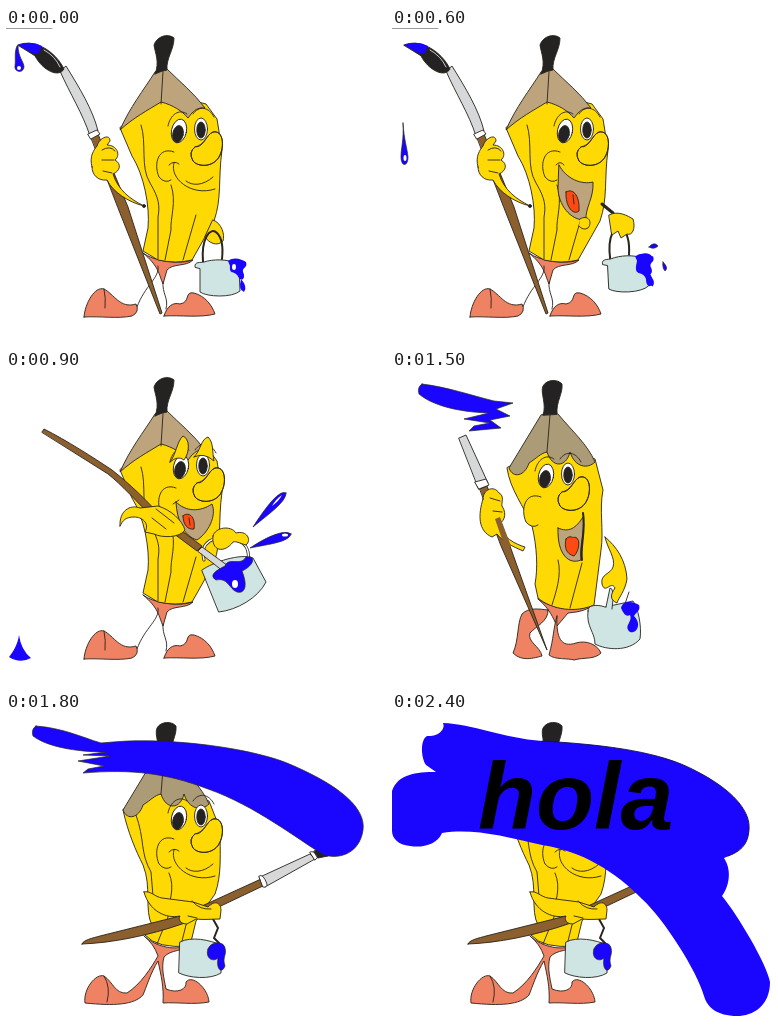
An HTML page for the animation above (2700 ms loop, 380 by 314 pixels).

```html
<!DOCTYPE html>
<html lang="es">
<head>
<meta charset="utf-8">
<title>hola</title>
<style>
  html, body { margin: 0; width: 100%; height: 100%; overflow: hidden; background: #fff; }
  svg { display: block; width: 100%; height: 100%; }
  path, ellipse { stroke: #29241c; stroke-width: .9; stroke-linejoin: round; stroke-linecap: round; fill: none; }
  .y { fill: #ffd903; }
  .tan { fill: #bda47d; }
  .dim { fill: #ac9b77; }
  .skin { fill: #ef8263; }
  .wood { fill: #8c5f2e; }
  .metal { fill: #d6d8da; }
  .tin { fill: #cfe5e4; }
  .k { fill: #242222; }
  .w { fill: #fff; }
  .red { fill: #ff4a12; }
  .b { fill: #1a06ff; stroke: none; }
  .drop { fill: #1a06ff; stroke-width: .7; }
  .shine { fill: #fff; stroke: none; }
  .gloss { stroke: #6b5cff; stroke-width: 2; opacity: .5; }
  text { font: italic bold 95px "Liberation Sans", Arial, sans-serif; }
</style>
</head>
<body>
<svg viewBox="0 0 380 314">
  <defs>
    <linearGradient id="fade" gradientUnits="userSpaceOnUse" x1="30" x2="60">
      <stop stop-color="#1a06ff" stop-opacity=".5"/>
      <stop offset="1" stop-color="#1a06ff"/>
    </linearGradient>
    <g id="feet">
      <path class="skin" d="M137 225C147 233 173 237 187 232C180 239 167 235 161 242L157 256C153 247 153 238 137 225Z"/>
      <path d="M152 238C154 250 139 257 131 279M157 254C156 266 163 270 160 281" stroke-width="1.6"/>
      <path class="skin" d="M78 289C79 275 89 258 98 261C108 266 114 281 130 276Q134 284 126 288C112 291 94 288 78 289Z"/>
      <path class="skin" d="M158 288C161 278 167 274 174 276C185 274 178 263 188 265C199 268 206 277 209 286C194 290 175 287 158 288Z"/>
      <path d="M98 261Q100 270 99 280"/>
    </g>
    <g id="pail">
      <path d="M197 234C195 211 204 198 211 205C217 211 217 222 216 231" style="stroke-width:2"/>
      <path class="tin" d="M189 239C188 233 195 235 198 234C207 231 221 231 229 235C235 236 235 240 233 242L234 263C226 270 201 269 194 264L194 241Z"/>
      <path class="b" d="M222 233C229 228 236 232 240 234C242 240 236 239 237 244C240 250 236 254 233 250C229 241 223 248 224 238Z"/>
      <path class="b" d="M235 251Q242 259 238 264Q232 262 235 251Z"/>
      <ellipse class="shine" cx="228" cy="239" rx="2" ry="3"/>
    </g>
    <g id="face">
      <ellipse class="w" cx="173" cy="103" rx="7.5" ry="12" transform="rotate(12 173 103)"/>
      <ellipse class="w" cx="195" cy="101" rx="6.5" ry="11"/>
      <ellipse class="k" cx="172" cy="106" rx="5.2" ry="8.5" transform="rotate(12 172 106)"/>
      <ellipse class="k" cx="195" cy="102" rx="4.2" ry="8"/>
      <path d="M162 98C164 87 173 80 181 86M187 86C193 77 203 79 208 89"/>
      <path class="y" d="M189 119C199 117 200 107 207 104C218 102 218 119 214 127C209 139 193 140 187 133Q182 124 189 119Z" stroke="none"/>
      <path d="M191 119C199 117 200 107 207 104C218 102 218 119 214 127C209 139 193 140 187 133Q182 124 189 119"/>
      <path class="y" d="M168 124C153 118 147 135 153 149Q159 156 165 152"/>
    </g>
    <path id="smile" d="M163 137Q168 132 173 136M168 135C163 150 185 169 209 161M180 153C186 158 197 158 207 149"/>
  </defs>

  <!-- legs -->
  <use data-on="0123" href="#feet"/>
  <g data-on="4">
    <path class="skin" d="M137 222C148 234 174 237 185 230L183 237C170 239 160 235 137 222Z"/>
    <path d="M143 228C137 234 139 242 137 246M161 237C158 252 161 264 160 277" stroke-width="1.6"/>
    <path class="skin" d="M103 219C116 215 122 229 126 237L138 236Q141 246 135 250C124 248 110 252 100 250C102 240 99 228 103 219Z"/>
    <path class="skin" d="M161 273C170 279 179 276 184 265C194 263 202 273 209 285C196 290 176 284 158 287Z"/>
  </g>
  <g data-on="57">
    <path class="skin" d="M146 229C160 239 184 242 202 235C191 242 184 242 176 243L165 256C161 248 158 239 146 229Z"/>
    <path class="skin" d="M156 240C147 239 137 237 130 244C125 253 127 270 121 283C130 292 142 288 150 286C148 276 135 272 138 263C143 257 157 251 156 240Z"/>
    <path class="skin" d="M165 246C161 260 162 267 157 285C163 290 176 288 182 290C192 287 202 290 209 283C205 274 194 270 184 273C169 278 164 268 165 246Z"/>
  </g>
  <g data-on="68">
    <path class="skin" d="M138 224C150 235 170 240 186 232C177 240 165 237 158 245C155 256 158 266 160 277C172 282 181 277 180 270C186 262 202 276 203 290C188 293 171 290 157 291C158 275 155 263 152 249C145 260 140 276 137 283C128 293 108 294 79 291C77 277 90 261 98 264C107 270 109 282 121 281C135 272 145 256 152 244Q148 232 138 224Z"/>
    <path d="M98 264Q105 275 101 290"/>
  </g>

  <!-- pencil body -->
  <g data-on="01234">
    <path class="y" d="M114 100L126 128C138 147 144 178 142 200L137 223L152 232Q170 236 186 232L208 193C216 170 212 151 216 122L211 91L200 76L158 65Z"/>
    <path d="M135 97C141 115 134 139 144 155C153 170 154 178 152 189L152 231M165 157C171 174 164 190 165 202L159 232M190 187L177 232"/>
    <path class="tan" d="M149 44C137 63 124 79 114 102C127 90 142 82 155 74C167 77 176 83 182 90Q190 78 199 80C188 65 174 54 161 41Z"/>
    <path d="M157 44L155 76"/>
    <path class="k" d="M149 46C154 34 149 25 148 17C151 8 162 5 168 10C168 22 160 30 161 42Q155 43 149 46Z"/>
  </g>
  <g data-on="57">
    <path class="y" d="M115 98C118 120 132 136 140 156C145 177 146 198 143 214L146 228C160 240 184 243 202 235L209 180C212 160 207 140 211 120L203 89L158 75Z"/>
    <path d="M166 190C170 205 164 222 160 235M190 193L178 238"/>
  </g>
  <g data-on="68">
    <path class="y" d="M117 98C122 121 130 139 137 153C146 175 138 198 146 213L139 223Q151 237 184 234L190 209L209 182C216 163 214 140 214 117L203 89L158 75Z"/>
    <path d="M130 103C139 128 134 141 145 160L147 184M163 161C170 177 162 190 162 205L151 232M186 189L175 233"/>
  </g>
  <g data-on="5678">
    <path class="dim" d="M149 45L117 98C121 109 133 106 137 93C145 88 149 83 155 82C160 98 174 98 178 82C183 98 196 99 203 92C196 75 180 61 166 44Z"/>
    <path d="M158 45L155 82"/>
    <path class="k" d="M151 45C155 34 148 23 151 16C155 9 166 9 170 14C171 24 164 31 165 44Z"/>
  </g>

  <!-- face -->
  <use data-on="012" href="#face"/>
  <use data-on="34" href="#face" x="2" y="-6"/>
  <use data-on="57" href="#face" x="-19" y="3"/>
  <use data-on="68" href="#face" y="3"/>
  <use data-on="01" href="#smile"/>
  <use data-on="68" href="#smile" y="3"/>
  <g data-on="2">
    <path class="tan" d="M167 137C174 151 190 157 201 154C202 170 193 180 194 192C178 193 166 176 166 160Z"/>
    <path class="red" d="M174 164C180 160 188 166 187 183C181 188 173 178 174 164Z"/>
    <path class="y" d="M188 191C196 186 201 194 196 200Q191 203 187 198"/>
    <path d="M164 137Q168 132 172 137M181 167L182 176"/>
  </g>
  <g data-on="34">
    <path class="y" d="M164 92C170 85 171 71 177 66C184 69 184 82 178 90Q172 85 164 92ZM188 87C195 80 195 69 202 67C208 73 206 82 208 91Q198 82 188 87Z"/>
    <path class="tan" d="M170 132C180 142 194 142 206 134C211 146 202 163 191 170C178 166 171 151 170 132Z"/>
    <path class="red" d="M177 146C182 141 190 146 188 159C182 160 177 155 177 146Z"/>
    <path d="M167 134L173 130M183 148L184 155"/>
  </g>
  <g data-on="57">
    <path class="tan" d="M166 158C177 163 184 158 191 147C193 163 187 177 189 190C177 195 165 185 166 158Z"/>
    <path class="red" d="M174 169C178 164 181 169 183 167C190 169 186 183 182 186C174 184 172 177 174 169Z"/>
    <path d="M191 143C194 161 188 176 190 190" style="stroke-width:2"/>
  </g>

  <!-- upright brush -->
  <g data-on="012">
    <path class="wood" d="M85 109L92 106L122 179L156 285L154 286L112 180Z"/>
    <path class="metal" d="M54 43L60 38C73 59 87 82 92 103L84 108C77 86 64 66 54 43Z"/>
    <path class="w" d="M82 106L91 102L94 106L85 111Z"/>
    <path class="k" d="M12 17C29 10 50 24 58 41C53 50 37 43 29 28Z"/>
    <path class="b" d="M12 17Q25 12 36 18L33 25L28 26Z"/>
    <path d="M38 22Q49 28 54 39" style="stroke:#ddd"/>
    <path class="y" d="M86 139C83 128 88 122 91 118C93 110 104 105 104 113L101 117C111 117 115 127 109 132C116 136 114 143 107 146C112 162 124 171 138 178C122 174 107 164 101 152C92 153 86 147 86 139Z"/>
    <path d="M96 122Q104 117 109 123M96 132L108 132M97 143L106 145"/>
    <ellipse class="k" cx="138" cy="178" rx="1.5" ry="1.5"/>
  </g>
  <path data-on="0" class="drop" d="M11 18C8 25 10 30 9 38C8 44 17 46 18 39C18 34 12 29 12 18Z"/>
  <path data-on="1" class="drop" d="M12 35C12 49 9 58 9 68C9 75 17 75 17 67C17 57 12 52 12 35Z"/>
  <path data-on="2" class="drop" d="M11 95C12 112 9 120 9 129C9 139 16 139 16 129C15 119 12 112 11 95Z"/>
  <ellipse data-on="0" class="shine" cx="13" cy="40" rx="2" ry="2"/>
  <ellipse data-on="2" class="shine" cx="13" cy="130" rx="1.5" ry="3"/>

  <!-- arm with pail -->
  <g data-on="01">
    <path class="y" d="M207 192C216 195 219 207 217 213C211 219 203 215 199 209Z"/>
    <use href="#pail"/>
  </g>
  <g data-on="2">
    <path d="M210 176L221 185" style="stroke-width:3"/>
    <use href="#pail" transform="translate(22 -4) rotate(-3 212 250)"/>
    <path class="y" d="M217 187C226 182 236 188 241 191C244 201 240 208 235 206L229 210L226 203L220 207Z"/>
    <path class="b" d="M246 228C254 222 264 227 259 235C253 239 258 242 260 251C262 260 254 261 254 251C251 242 243 249 244 238Z"/>
    <path class="drop" d="M257 219Q262 213 266 218Q262 222 257 219ZM271 234Q277 240 273 243Q270 240 271 234Z"/>
  </g>

  <!-- dipping -->
  <g data-on="34">
    <path class="tin" d="M196 200C207 192 235 183 247 188L260 212C252 228 231 240 213 242Z"/>
    <path d="M198 190C193 171 209 166 224 168C241 171 245 181 241 195" style="stroke-width:3"/>
    <path d="M198 190C193 171 209 166 224 168C241 171 245 181 241 195" style="stroke:#fff;stroke-width:1.4"/>
    <path class="wood" d="M36 62L38 59C60 70 88 88 106 100C125 115 140 130 152 143L196 176L191 181L148 149C132 133 115 114 102 104Z"/>
    <path class="metal" d="M192 181L196 177L225 198L220 203Z"/>
    <path class="y" d="M114 156C113 141 124 134 134 138L152 136C165 140 176 150 179 160C174 168 156 168 148 164L139 162C144 153 136 147 128 147C120 147 117 150 114 156Z"/>
    <path d="M150 139L168 153M146 148L160 159"/>
    <path class="y" d="M207 166C209 157 225 155 230 163C241 160 246 170 240 175C233 173 230 171 227 172C218 184 205 181 207 166Z"/>
    <path class="drop" d="M219 196C222 186 235 197 240 187C250 185 249 195 236 201C242 216 239 224 231 222C223 219 222 207 210 210C202 205 211 200 219 196Z"/>
    <ellipse class="shine" cx="229" cy="214" rx="3" ry="4"/>
    <path class="drop" d="M280 123C275 120 265 129 247 157C264 143 280 132 280 123ZM285 164C279 159 262 166 244 178C264 174 283 172 285 164Z"/>
    <ellipse class="shine" cx="279" cy="165" rx="3" ry="1.5"/>
    <path class="shine" d="M276 125Q270 129 266 136Q273 131 276 125Z"/>
  </g>
  <g data-on="4">
    <path class="drop" d="M158 189C142 175 115 178 109 193C108 205 121 211 130 204C135 195 145 188 158 189ZM187 211C164 209 145 224 144 240C147 251 158 248 161 239C164 227 175 217 187 211ZM207 208C190 217 174 242 177 256C181 267 191 261 192 248C192 233 199 220 207 208Z"/>
    <path class="drop" d="M199 238C202 253 194 264 198 272C204 276 208 270 205 262C200 254 202 247 199 238ZM252 109C246 108 243 119 241 133C248 126 255 114 252 109ZM65 124C60 139 60 153 61 167C64 154 66 139 65 124ZM71 71C62 76 55 89 57 97Q64 82 71 71Z"/>
    <path class="b" d="M273 209C265 207 258 212 260 218Q268 219 273 209ZM272 233Q283 240 271 243ZM173 250Q180 260 172 263Q167 260 173 250Z"/>
    <path class="b" d="M28 269C37 265 47 265 49 272C45 279 64 274 72 280C73 287 55 286 50 290C66 290 67 296 54 298C43 299 45 304 35 303C20 302 17 297 31 295C33 290 18 294 7 286C2 278 19 274 34 277C39 273 30 274 28 269Z"/>
    <path class="b" d="M5 252Q14 253 12 259Q5 260 5 252ZM53 243Q43 249 43 258Q51 253 53 243ZM66 271Q77 265 88 270Q76 276 66 271Z"/>
    <path class="b" d="M243 281C247 274 256 278 259 273C268 270 270 275 263 278C274 281 267 284 258 283C259 290 247 288 248 283ZM266 267Q270 261 275 266Q270 269 266 267Z"/>
    <path class="shine" d="M112 199C111 193 115 188 119 189Q115 195 117 201ZM34 298Q42 296 49 293Q44 299 34 298ZM29 272Q35 269 43 269Q37 273 29 272ZM75 271Q80 268 85 270Q80 273 75 271Z"/>
    <ellipse class="shine" cx="151" cy="240" rx="3" ry="4"/>
    <ellipse class="shine" cx="184" cy="254" rx="2.5" ry="5"/>
    <ellipse class="shine" cx="201" cy="269" rx="2" ry="3"/>
    <ellipse class="shine" cx="249" cy="115" rx="1.5" ry="4" transform="rotate(20 249 115)"/>
  </g>
  <path data-on="3" class="b" d="M13 265C12 274 7 282 3 287Q14 294 25 288Q15 280 13 265Z"/>

  <!-- painting to the left -->
  <g data-on="57">
    <path class="wood" d="M88 119L95 116L118 176L155 280L109 176Z"/>
    <path class="metal" d="M67 68L74 65L96 113L87 119Z"/>
    <path class="w" d="M83 112L94 109L97 115L87 119Z"/>
    <path class="y" d="M91 129C91 119 102 115 107 123C113 126 109 133 110 136C116 145 111 153 106 154C111 168 123 174 133 177L131 181C120 176 111 172 105 164L100 167C86 161 86 145 91 129Z"/>
    <path class="wood" d="M103 149L108 147L119 176L113 178Z" style="stroke:none"/>
    <path d="M98 128L108 131M101 141L110 142"/>
    <path class="tin" d="M196 241C195 235 205 234 213 237L241 231C246 238 250 256 248 269C237 282 214 280 203 274C203 262 194 257 196 241Z"/>
    <path class="tin" d="M214 237L218 218Q223 218 220 239M233 234L237 222"/>
    <path class="y" d="M213 167C224 176 234 190 235 209C233 221 227 227 225 233C218 230 218 225 223 218C219 210 213 225 210 214C208 204 219 204 221 197C224 188 215 178 213 167Z"/>
    <path class="b" d="M229 238C231 229 243 232 247 235C249 241 244 242 242 246C250 254 245 264 238 262C231 256 241 252 238 245Q233 248 229 238Z"/>
  </g>

  <!-- painting to the right -->
  <g data-on="68">
    <path d="M207 207L212 216L208 226L213 231" style="stroke-width:2"/>
    <path class="tin" d="M174 230C185 224 204 228 215 233L215 261C204 268 183 266 173 261Z"/>
    <path class="drop" d="M202 237C205 229 218 229 219 236C221 243 216 245 219 254C216 262 210 258 212 246C206 251 199 245 202 237Z"/>
    <path class="wood" d="M76 232C77 228 87 226 94 224L174 204L255 167L259 173L179 211C142 224 105 231 76 232Z"/>
    <path class="metal" d="M254 165L304 142L309 147L259 175Z"/>
    <path class="w" d="M253 164Q257 161 261 172Q261 176 257 175ZM304 140Q308 138 312 145L309 148Z"/>
    <path class="k" d="M308 139L321 134L322 144L312 146Z"/>
    <path class="y" d="M138 180C144 178 149 185 156 186L187 190L202 195C210 187 215 192 215 198L214 207C206 207 198 208 190 207L181 212C174 212 172 207 174 204C160 207 143 199 138 180Z"/>
    <path d="M187 190Q194 198 205 197M182 204L191 206"/>
  </g>

  <!-- paint -->
  <path data-on="5" class="drop" d="M30 14C55 17 78 25 102 31L121 33L104 39L118 46L98 50L109 58L77 61L82 56L98 53L72 49L97 43C65 42 40 35 27 24Q25 17 30 14Z"/>
  <path data-on="6" class="drop" d="M30 14C57 16 75 25 95 31L107 30C162 25 250 36 288 54C336 75 360 97 357 118C354 140 335 148 318 143C291 127 250 94 202 77C160 61 126 57 77 61L82 57L98 54L72 49L104 44L77 43L100 40C68 40 40 34 27 24Q25 17 30 14Z"/>
  <g data-on="7">
    <path fill="url(#fade)" style="fill:url(#fade);stroke:none" d="M51 11C80 12 111 26 150 29C220 33 270 41 302 58C342 78 359 100 357 118C356 135 345 141 333 144C342 163 335 185 309 189C290 190 270 169 254 163C225 147 200 120 160 102C122 84 80 76 56 76C43 74 34 66 38 58C29 51 28 28 35 24C45 25 54 18 51 11Z"/>
    <path class="gloss" d="M222 63Q238 65 252 71M250 85Q264 84 281 88M296 94Q314 100 326 110"/>
  </g>
  <g data-on="8">
    <path class="b" d="M51 11C80 12 111 26 150 29C220 33 270 41 302 58C342 78 359 100 357 118C356 135 345 141 332 146C341 160 336 176 330 184C345 202 375 252 378 270C378 294 361 304 345 304C325 304 315 295 312 284C305 259 272 207 250 187C224 160 190 139 150 133C112 124 80 116 50 121C45 133 30 136 18 134C6 133 0 126 0 119L0 79C6 62 24 60 44 60L34 53C29 46 28 28 35 24C45 25 54 18 51 11Z"/>
    <text x="86" y="117">hola</text>
  </g>
  <path data-on="78" d="M150 29C220 33 270 41 302 58C342 78 359 100 357 118C356 134 347 140 336 144" style="stroke:#15104a"/>
  <path data-on="012" d="M0 0H46"/>
</svg>
<script>
  const layers = [...document.querySelectorAll('[data-on]')];
  const start = performance.now();
  let last = -1;

  function tick() {
    const step = Math.floor((performance.now() - start) % 2700 / 300);
    if (step !== last) {
      last = step;
      for (const el of layers)
        el.style.display = el.dataset.on.includes(step) ? '' : 'none';
    }
    requestAnimationFrame(tick);
  }
  tick();
</script>
</body>
</html>
```
